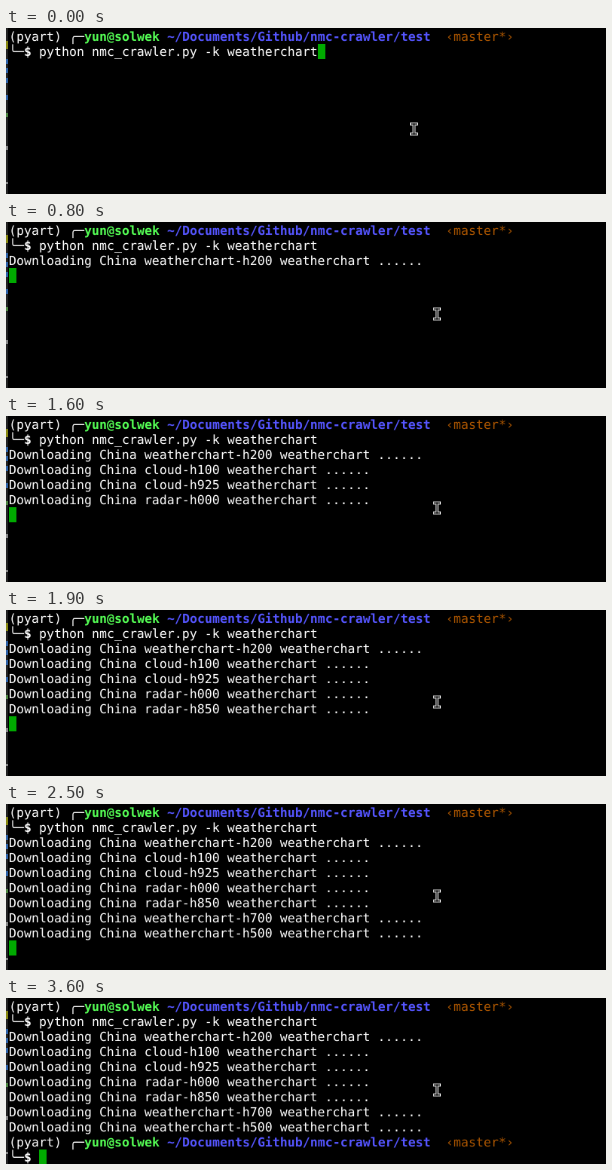
An HTML page with a canvas that plays this animation: 600 by 166 pixels, repeating every 3700 ms.

```html
<!DOCTYPE html>
<html lang="en">
<head>
<meta charset="utf-8">
<title>Terminal download</title>
<style>
  html, body { margin: 0; width: 100%; height: 100%; overflow: hidden; background: #000; }
  canvas { display: block; }
</style>
</head>
<body>
<canvas id="stage" width="600" height="166"></canvas>
<script>
const LOOP = 3700, MOVE = 100, ENTER = 400, DONE = 3300;
// The terminal is drawn on whole cells, then scaled down onto the stage.
const CELL_W = 10, CELL_H = 20, BASELINE = 16, SCALE = 0.7535, LEFT = 2.9, TOP = 0.8;
const FONT = '16.6px "DejaVu Sans Mono", monospace';
const WHITE = "#fff", GREEN = "#5f5", BLUE = "#55f", BROWN = "#a50", CARET = "#0a0";

const charts = [
  [600, "weatherchart-h200"], [900, "cloud-h100"], [1300, "cloud-h925"],
  [1600, "radar-h000"], [1900, "radar-h850"],
  [2200, "weatherchart-h700"], [2400, "weatherchart-h500"]
];
// Each row is a list of [text, colour, weight] runs.
const head = [
  ["(pyart) ", WHITE], ["╭─", WHITE, "bold"], ["yun@solwek ", GREEN, "bold"],
  ["~/Documents/Github/nmc-crawler/test  ", BLUE, "bold"], ["‹master*›", BROWN]
];
const prompt = [["╰─$ ", WHITE, "bold"]];
const command = [...prompt, ["python nmc_crawler.py -k weatherchart", WHITE]];

const stage = document.getElementById("stage").getContext("2d");
const term = document.createElement("canvas").getContext("2d");
term.canvas.width = 800;
term.canvas.height = 220;
term.textRendering = "geometricPrecision";
stage.imageSmoothingQuality = "high";

function rowsAt(t) {
  const rows = [head, command];
  for (const [start, name] of charts)
    if (t >= start) rows.push([[`Downloading China ${name} weatherchart ......`, WHITE]]);
  if (t >= DONE) rows.push(head, prompt);
  else if (t >= ENTER) rows.push([]);
  return rows;
}

function drawTerminal(rows) {
  term.fillStyle = "#000";
  term.fillRect(0, 0, 800, 220);
  let col = 0;
  rows.forEach((row, y) => {
    col = 0;
    for (const [text, color, weight = "normal"] of row) {
      term.font = `${weight} ${FONT}`;
      term.fillStyle = color;
      term.fillText(text, col * CELL_W, y * CELL_H + BASELINE);
      col += text.length;
    }
  });
  term.fillStyle = CARET;
  term.fillRect(col * CELL_W, (rows.length - 1) * CELL_H, CELL_W, CELL_H);
  stage.drawImage(term.canvas, LEFT, TOP, 800 * SCALE, 220 * SCALE);
}

function drawEdge() {
  const spot = (color, y, h) => {
    stage.fillStyle = color;
    stage.fillRect(0, y, 2, h);
  };
  spot("#222", 0, 166);
  spot("#881", 13, 8);
  for (const y of [31, 40, 50, 67]) spot("#2d62a8", y, 5);
  spot("#4d8540", 85, 4);
  spot("#888", 118, 4);
  spot("#888", 154, 2);
}

function drawMouse(x, y) {
  const beam = new Path2D("M-2.5-5H2.5M0-5V5M-2.5 5H2.5");
  stage.save();
  stage.translate(x, y);
  stage.lineCap = "square";
  for (const [color, width] of [["#ccc", 3], ["#000", 1]]) {
    stage.strokeStyle = color;
    stage.lineWidth = width;
    stage.stroke(beam);
  }
  stage.restore();
}

function draw() {
  const t = performance.now() % LOOP;
  stage.fillStyle = "#000";
  stage.fillRect(0, 0, 600, 166);
  drawTerminal(rowsAt(t));
  drawEdge();
  if (t < MOVE) drawMouse(408, 101);
  else drawMouse(431, 92);
  requestAnimationFrame(draw);
}
draw();
</script>
</body>
</html>
```
